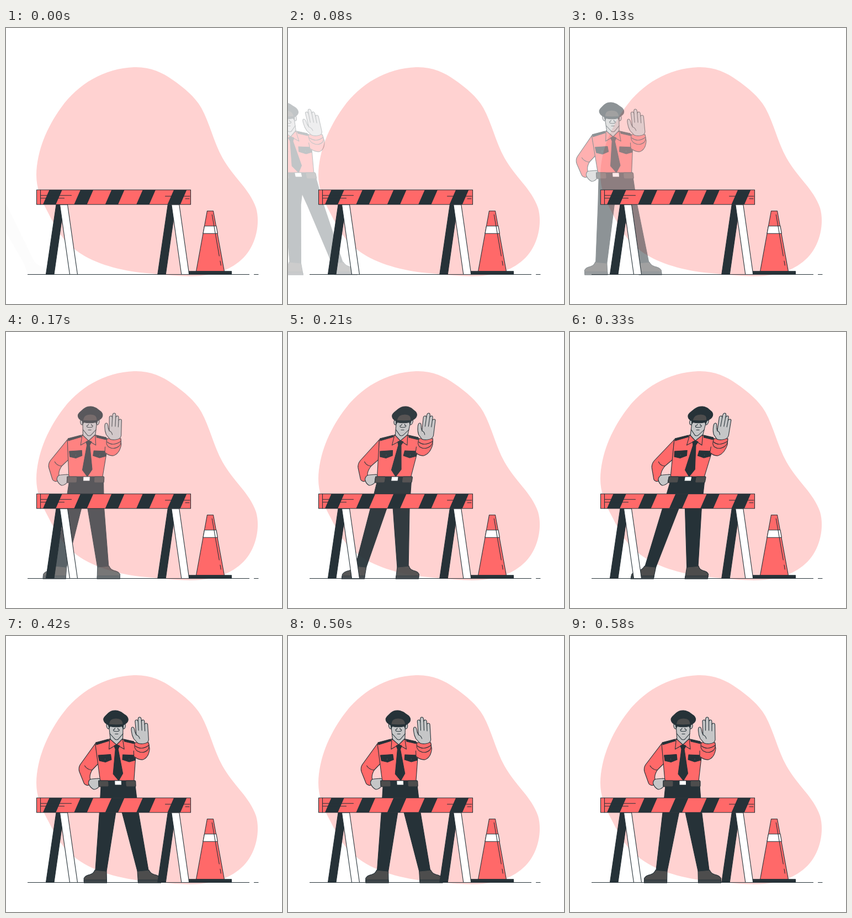
Write an HTML page that moves like this. It is 500 px wide and 500 px high and loops after 0.62 s.

```html
<!DOCTYPE html>
<html lang="en">
<head>
<meta charset="utf-8">
<title>Officer at a barrier</title>
<style>
  html, body { margin: 0; width: 100%; height: 100%; overflow: hidden; background: #fff; }
  svg { display: block; width: 100%; height: 100%; }
  .red { fill: #ff6969; }
  .dark { fill: #263238; }
  .grey { fill: #4d4d4d; }
  .sole { fill: #3f464a; }
  .skin { fill: #c5c6c7; }
  .white { fill: #fff; }
  .line { fill: none; }
  .ink { stroke: #263238; stroke-width: 1.1; stroke-linejoin: round; stroke-linecap: round; }
  .button { stroke: #66707a; }
</style>
</head>
<body>
<svg viewBox="0 0 500 500">
  <path fill="#ffd2d1" d="M232 71C260 70 283 80 302 94C322 108 342 124 354 145C369 172 376 206 392 235C412 271 441 291 453 326C461 354 453 390 434 412C414 435 385 446 352 449C320 452 280 446 243 443C200 438 153 424 126 402C104 387 90 362 77 336C63 310 55 290 55 266C56 222 74 180 100 144C131 101 178 73 232 71Z"/>
  <path class="ink line" d="M39.500 446.500H440.500M449.500 446.500H457"/>

  <g id="officer" class="ink">
    <!-- legs and shoes -->
    <g id="shoe">
      <path class="grey" d="M155 424L176 426L175.500 447H134.500V439Q137 434 146 432Q153 430 155 424Z"/>
      <path class="sole" d="M134.500 442H175.500V447H134.500Z"/>
    </g>
    <use href="#shoe" transform="matrix(-1 0 0 1 408 0)"/>
    <path class="dark" d="M173 271H235L238.500 318L252 424L232 426L209 320L204 300L197.500 320L176 426L156 424L168 320Z"/>

    <!-- shirt -->
    <path class="red" d="M166 195L137 233Q133 239 135 246L142.500 267Q146 272 151.500 270Q149 263 154 260Q152 253 158 243L170 231Z"/>
    <path class="line" d="M145 235Q149 242 158 243"/>
    <path class="red" d="M192 187L166 195L172 263H233L238 220V193L217 187Z"/>
    <path class="dark" d="M167 193L190 187L191 190L168 197ZM218 187L236 191V195L219 191Z"/>
    <path class="dark" d="M170.500 216L193 214.500L194 224L183 228.500L172 226ZM215 215L238 216L237 225L226 228L214 224Z"/>
    <path class="line button" d="M182.500 223h.1M226 223h.1"/>

    <!-- head -->
    <path class="skin" d="M191 158Q187 158 188 164Q189 169 193 168ZM219 158Q223 158 222 164Q221 169 217 168Z"/>
    <path class="skin" d="M192 160L194 190L205 198L216 190L218 160Z"/>
    <path class="line" d="M193.500 177L202 187Q205 189 208 187L217 177"/>
    <path class="dark" d="M191 159H219L217.500 167L216 163.500Q205 166 194 163.500L192.500 167Z"/>
    <path class="line" d="M200.500 172Q199 169 202 169L203 167M208 167L208.500 169Q212 169 210 172Q205 174 200.500 172M203 177.500H208"/>
    <path class="dark" d="M183 151C183 147 188 144 192 140C197 135 202 134.800 206 135C214 135.500 217 139 221 142C226 145 228 148 227.500 152C227 156 223 159 219 161Q205 165 191 161C187 159 183 156 183 151Z"/>
    <path class="grey" d="M192.500 160C193 152 198 149 205.500 149C213 149 218 152 218 160Q205 162 192.500 160Z"/>

    <!-- collar and tie -->
    <path class="red" d="M192.500 186L190.500 205L204.500 197ZM216 186L218 205L204.500 197Z"/>
    <path class="dark" d="M200 199L204.500 196.500L210 199L207 205L213.500 249L205.500 262L196 250L202 205Z"/>

    <!-- belt -->
    <path class="dark" d="M170 262H235V272H170Z"/>
    <path class="skin" d="M150.500 267Q151 259 157 259L169 258Q173 259 172 262H169V273Q166 277 160 278Q153 275 150.500 267Z"/>
    <rect class="grey" x="169" y="262" width="18" height="11" rx="2"/>
    <rect class="grey" x="218" y="262" width="18" height="11" rx="2"/>
    <rect class="white" x="198" y="262" width="12.500" height="8"/>

    <!-- raised arm -->
    <path class="red" stroke="none" d="M237 193L235 219Q243 225 251 224Q262 220 264 204L262 193Z"/>
    <path class="line" d="M235 208V218Q243 225 251 224Q262 220 264 204L262.500 193M236 193L238 195"/>
    <path class="red" d="M238 193Q235 203 241 208Q251 214 260 207Q265 202 262.500 193Z"/>
    <path class="line" d="M238 199Q249 208 263 198"/>
    <path class="skin" d="M243 194L236 186Q233 180 232.500 172Q232 165 235 165Q238 165 239 174L241 179L240 155Q240 152 243 152Q245 152 245.500 156V151Q246 147 248.500 147Q251 147 251.500 151V155Q252 152 254.500 152Q257 152 257 156V160Q258 158 260 158Q262.500 158 262.500 161L263 188Q262 194 254 195Q247 196 243 194Z"/>
    <path class="line" d="M245.500 156V171M251.500 155V171M257 160V172M241 179Q246 181 247 186"/>
  </g>

  <!-- barrier -->
  <g class="ink">
    <g id="trestle">
      <path class="dark" d="M91 320H105L87 446H72.500Z"/>
      <path class="white" d="M97.500 320H111.500L129.500 446.500H115.500Z"/>
    </g>
    <use href="#trestle" x="202.300"/>
    <path class="red" d="M55.500 293.200H334.500V319.800H55.500Z"/>
    <g id="stripes" class="dark" stroke="none"></g>
    <path class="line" d="M62.500 293.200V319.800M62.500 303.300H118.500M62.500 308.300H105.500M288.500 304.800H333M325 309.300H332"/>
  </g>

  <!-- cone -->
  <g class="ink">
    <path class="red" d="M364.500 331.500H375.500L395.500 441H344.500Z"/>
    <path class="white" d="M359.500 358.700H381L383.300 372.200H357Z"/>
    <path class="line" d="M373.300 338L386.300 413M388 422L389.300 430"/>
    <path class="dark" d="M331.500 440.700H408.500V446H331.500Z"/>
  </g>
</svg>
<script>
  const LOOP = 620, FPS = 24, STEPS = 15;
  const ENTRANCE = 600, PIVOT_Y = 291;
  const LEAD = ENTRANCE - (STEPS - 1) * 1000 / FPS; // the last step shows the final pose
  const officer = document.getElementById('officer');

  document.getElementById('stripes').innerHTML = [0, 1, 2, 3, 4].map(i =>
    `<path d="M${78.5 + i * 56.4} 293.200h23.300l-11.600 26.600h-23.300Z"/>`).join('');

  const bezier = (a, b, s) => 3 * (1 - s) ** 2 * s * a + 3 * (1 - s) * s * s * b + s ** 3;

  // Ease with a slight overshoot: cubic-bezier(.36, -.01, .5, 1.38)
  function ease(x) {
    let low = 0, high = 1;
    for (let i = 0; i < 24; i++) {
      const mid = (low + high) / 2;
      if (bezier(0.36, 0.5, mid) < x) low = mid; else high = mid;
    }
    return bezier(-0.01, 1.38, low);
  }

  const keys = [
    { at: 0, x: -250, skew: 20, opacity: 0 },
    { at: 0.6, x: 0, skew: -10, opacity: 1 },
    { at: 0.8, x: 0, skew: 3.6, opacity: 1 },
    { at: 1, x: 0, skew: 0, opacity: 1 }
  ];

  function pose(progress) {
    const p = Math.min(progress, 1);
    const next = Math.max(1, keys.findIndex(k => k.at >= p));
    const from = keys[next - 1], to = keys[next];
    const k = ease((p - from.at) / (to.at - from.at));
    const mix = name => from[name] + (to[name] - from[name]) * k;
    return { x: mix('x'), skew: mix('skew'), opacity: Math.max(0, Math.min(1, mix('opacity'))) };
  }

  // The motion advances in steps that start on whole hundredths of a second.
  function stepAt(time) {
    let step = STEPS - 1;
    while (step > 0 && 10 * Math.round(step * 100 / FPS) > time) step--;
    return step;
  }

  function draw(time) {
    const progress = (stepAt(time) * 1000 / FPS + LEAD) / ENTRANCE;
    const { x, skew, opacity } = pose(Math.round(progress * 1e6) / 1e6);
    const slope = Math.tan(skew * Math.PI / 180);
    officer.setAttribute('transform', `matrix(1 0 ${slope} 1 ${x - slope * PIVOT_Y} 0)`);
    officer.setAttribute('opacity', opacity);
  }

  let start;
  function tick(now) {
    start ??= now;
    draw((now - start) % LOOP);
    requestAnimationFrame(tick);
  }
  draw(0);
  requestAnimationFrame(tick);
</script>
</body>
</html>
```
